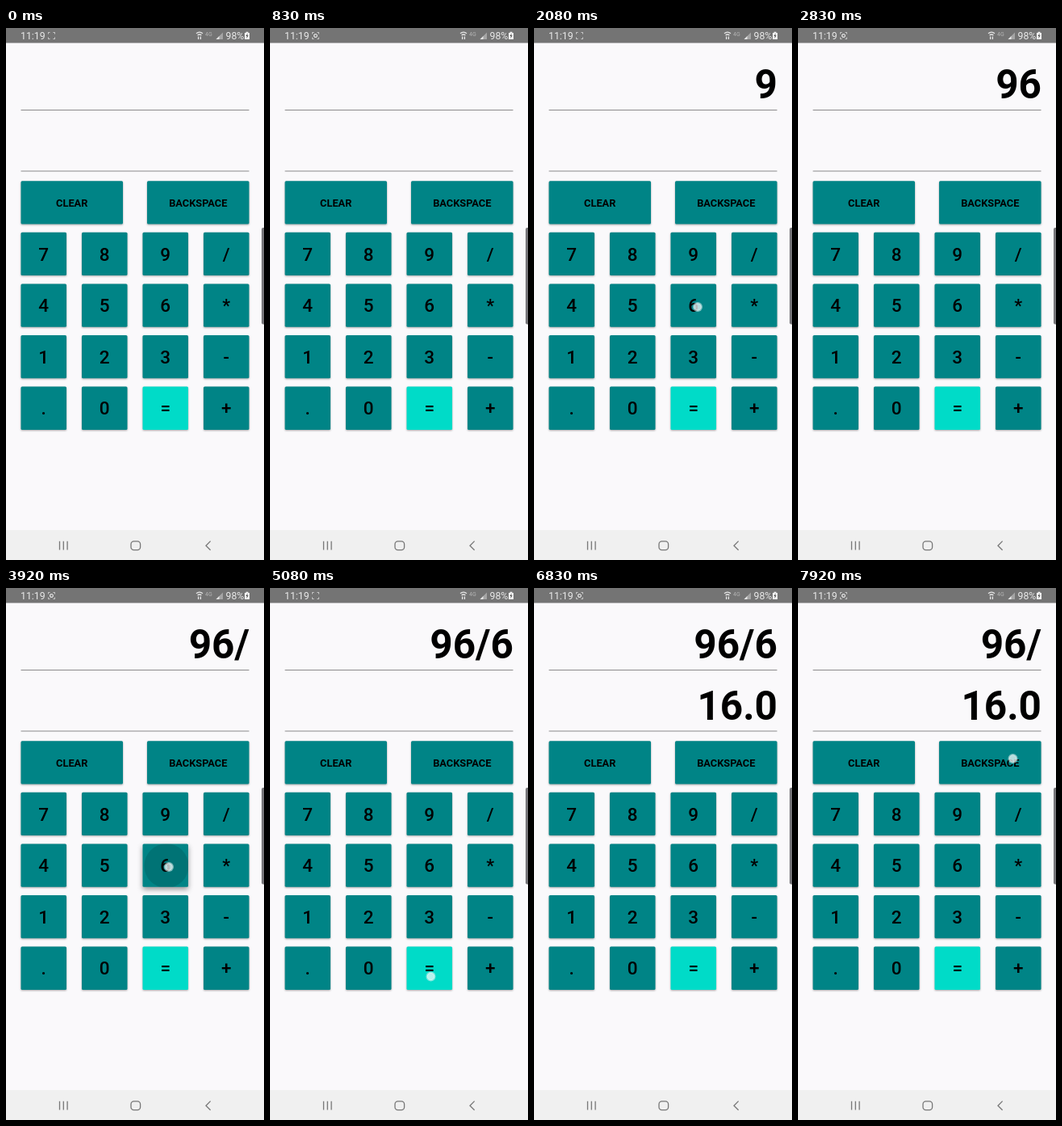
Recreate the animation shown at these times as an HTML page. Size 320 by 658 pixels, loop 8 s.

```html
<!DOCTYPE html>
<html lang="en">
<head>
<meta charset="utf-8">
<title>Calculator</title>
<style>
  html, body { margin: 0; width: 100%; height: 100%; overflow: hidden; background: #faf9fb; }
  svg { display: block; width: 320px; height: 658px; font-family: Roboto, sans-serif; }
  .key { fill: #008486; filter: drop-shadow(0 1px 1px #0005); }
  .key.accent { fill: #00dbc8; }
  .key.raised { filter: drop-shadow(0 3px 3px #0006); }
  .label { font-size: 22.5px; font-weight: 500; text-anchor: middle; }
  .label.wide { font-size: 12.8px; font-weight: 700; }
  .display { font-size: 49.5px; font-weight: 700; text-anchor: end; }
  .rule { fill: #8b8a8b; }
  .status { fill: #e9e9e9; font-size: 12.3px; }
  .line { fill: none; stroke: #e6e6e6; }
  .nav { fill: none; stroke: #777; stroke-width: 1.3; }
</style>
</head>
<body>
<svg viewBox="0 0 320 658">
  <defs><clipPath id="clip"><rect id="clipBox" rx="1.5"/></clipPath></defs>
  <rect width="320" height="658" fill="#faf9fb"/>

  <rect width="320" height="18.5" fill="#747474"/>
  <text class="status" x="18" y="14">11:19</text>
  <path class="line" opacity=".75" d="M52.5 7.5v-2h2M58.5 5.5h2v2M60.5 11.5v2h-2M54.5 13.5h-2v-2"/>
  <circle id="blink" class="line" cx="56.5" cy="9.5" r="1.9" stroke-width="1.2"/>
  <g class="line" stroke-width="1.3">
    <path d="M236 6.8q4-3.4 8 0M237.6 9q2.4-2 4.8 0"/>
    <path d="M238.6 10.5v3.5M241.4 10.5v3.5"/>
  </g>
  <text x="247" y="10" font-size="7" fill="#b5b5b5">4G</text>
  <path d="M260.5 14l8.5-8.5v8.5z" fill="#a5a5a5"/>
  <path d="M260.5 14l4-4v4z" fill="#e6e6e6"/>
  <text class="status" x="272.5" y="14">98%</text>
  <path d="M296 6h1.6v-1.3h2.8v1.3h1.6v8h-6z" fill="#f2f2f2"/>
  <path d="M299.8 6.5l-2.3 3.6h1.4l-.6 2.8 2.3-3.7h-1.4z" fill="#444"/>

  <text id="entry" class="display" x="302" y="87"/>
  <rect class="rule" x="18.5" y="101" width="283" height="1"/>
  <text id="result" class="display" x="302" y="163"/>
  <rect class="rule" x="18.5" y="176.5" width="283" height="1"/>

  <g id="keys"></g>
  <circle id="ripple" clip-path="url(#clip)"/>
  <g id="labels"></g>

  <rect x="317" y="247" width="6" height="119.5" rx="2" fill="#77767a"/>
  <rect y="621" width="320" height="37" fill="#f0f0f0"/>
  <path class="nav" d="M66.5 634.8v10.8M71.3 634.8v10.8M76.1 634.8v10.8"/>
  <rect class="nav" x="155" y="634.8" width="11.6" height="10.8" rx="3.6"/>
  <path class="nav" d="M253.6 634.6l-5.6 5.6 5.6 5.6"/>

  <g id="touch">
    <circle r="6" fill="#e4f3f3" fill-opacity=".55"/>
    <circle r="4.2" fill="#fff" fill-opacity=".45" stroke="#fff" stroke-opacity=".5"/>
  </g>
</svg>
<script>
const LOOP = 8000;
const el = id => document.getElementById(id);
const clamp = v => Math.min(1, Math.max(0, v));

function add(parent, tag, attrs, text = '') {
  const node = document.createElementNS('http://www.w3.org/2000/svg', tag);
  for (const name in attrs) node.setAttribute(name, attrs[name]);
  node.textContent = text;
  return parent.appendChild(node);
}
function set(node, attrs) {
  for (const name in attrs) node.setAttribute(name, attrs[name]);
}

const keys = {};
function addKey(label, x, y, width, wide) {
  const height = 53.3;
  const node = add(el('keys'), 'rect', {
    class: label === '=' ? 'key accent' : 'key', x, y, width, height, rx: 1.5
  });
  const cx = x + width / 2, cy = y + height / 2;
  add(el('labels'), 'text', {
    class: wide ? 'label wide' : 'label', x: cx, y: cy + (wide ? 5 : 8.2)
  }, label);
  keys[label] = { node, x, y, width, height, cx, cy };
}

addKey('CLEAR', 18.5, 189.2, 126.5, true);
addKey('BACKSPACE', 175, 189.2, 126.5, true);
['789/', '456*', '123-', '.0=+'].forEach((row, r) =>
  [...row].forEach((label, c) =>
    addKey(label, 18.5 + c * 75.5, 252.8 + r * 63.6, 56.5)));

// down, ripple start and up are times in ms
const presses = [
  { key: '9', x: 208, y: 281, down: 1240, ripple: 1300, up: 1490 },
  { key: '6', x: 203, y: 345, down: 2070, ripple: 2130, up: 2320 },
  { key: '/', x: 274, y: 283, down: 2990, ripple: 3050, up: 3200 },
  { key: '6', x: 202, y: 345, down: 3910, ripple: 3845, up: 3990 },
  { key: '=', x: 199.5, y: 480.5, down: 5040, ripple: 5110, up: 5230 },
  { key: 'BACKSPACE', x: 266.5, y: 211, down: 7740, ripple: 7960, up: 7990 }
];
const entries = [[0, ''], [1490, '9'], [2320, '96'], [3160, '96/'], [3990, '96/6'], [7910, '96/']];
const results = [[0, ''], [5230, '16.0']];
const textAt = (steps, t) => steps.filter(s => s[0] <= t).pop()[1];

function drawPress(p, t) {
  const key = keys[p.key];
  const grow = 1 - (1 - clamp((t - p.ripple) / 225)) ** 3;
  const reach = Math.hypot(key.width, key.height) / 2;
  const { x, y, width, height } = key;
  set(el('clipBox'), { x, y, width, height });
  set(el('ripple'), {
    cx: p.x + (key.cx - p.x) * grow,
    cy: p.y + (key.cy - p.y) * grow,
    r: reach * grow,
    opacity: 0.13 * (1 - clamp((t - p.up - 20) / 140))
  });
  key.node.classList.toggle('raised', t >= p.ripple && t < p.up + 120);

  const fade = clamp((t - p.up) / 230);
  set(el('touch'), { transform: `translate(${p.x} ${p.y})`, opacity: 1 - fade });
}

function draw(t) {
  set(el('blink'), { visibility: t % 1000 < 495 ? 'hidden' : 'visible' });
  el('entry').textContent = textAt(entries, t);
  el('result').textContent = textAt(results, t);
  for (const label in keys) keys[label].node.classList.remove('raised');

  const press = presses.find(p => t >= p.down && t < p.up + 250);
  const visibility = press ? 'visible' : 'hidden';
  set(el('ripple'), { visibility });
  set(el('touch'), { visibility });
  if (press) drawPress(press, t);
}

const start = performance.now();
function tick() {
  draw((performance.now() - start) % LOOP);
  requestAnimationFrame(tick);
}
tick();
</script>
</body>
</html>
```
